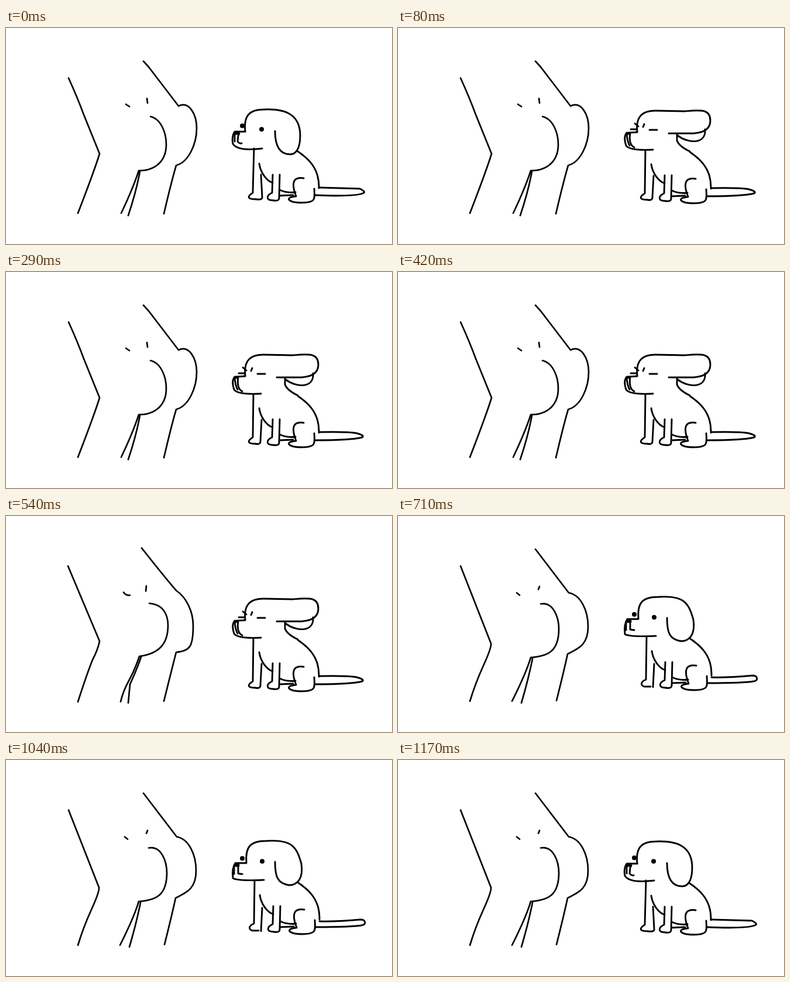
Animation of 660x371 px, one loop 1210 ms. Source, as an HTML page:

```html
<!DOCTYPE html>
<html>
<head>
<meta charset="utf-8">
<style>
  html, body { margin: 0; width: 100%; height: 100%; overflow: hidden; background: #fff; }
  svg { display: block; width: 660px; height: 371px; }
  path { fill: none; stroke: #000; stroke-width: 2.7; stroke-linecap: round; stroke-linejoin: round; }
  .dog path { stroke-width: 2.9; }
  .dog .eyes { stroke-width: 8; }
</style>
</head>
<body>
<svg viewBox="0 0 660 371">
  <g id="round">
    <path d="M107 86Q122 119 133 149L160 216Q150 248 123 318"/>
    <path d="M235 57L244 67L295 134C313 125 326 148 326 172C326 198 313 230 291 236Q283 263 270 319"/>
    <path d="M247 152C265 156 274 180 274 200C274 228 256 245 227 245Q217 276 197 318M229 246Q223 280 209 322"/>
    <path d="M205 131L211 135M241 121L242 129"/>
  </g>
  <g id="tight">
    <path d="M106 86L160 215Q157 230 148 247Q138 272 123 319"/>
    <path d="M232 55Q268 101 291 128C309 140 320 165 320 188C320 222 316 232 291 234Q286 253 270 318"/>
    <path d="M245 150C268 152 277 168 277 188C277 222 259 237 228 241Q220 265 210 283T196 319M231 242Q224 263 212 289L209 321"/>
    <path d="M201 131Q205 137 212 136M240 120L239 129"/>
  </g>
  <g id="loose">
    <path d="M107 86L159 219Q160 226 146 257T123 318"/>
    <path d="M235 57L292 132C312 135 325 162 325 190C325 222 308 228 290 237Q284 265 271 317"/>
    <path d="M244 151C266 147 275 175 275 194C275 232 257 241 227 243Q219 270 195 318M230 245Q223 280 211 321"/>
    <path d="M203 132L208 136M242 121L240 126"/>
  </g>

  <g class="dog">
    <g id="torso">
      <path d="M433 233C435 248 445 262 456 266M456 252L455 283C444 288 445 296 456 296Q467 298 467 292L468 252"/>
      <path d="M468 278Q480 284 495 282M468 288L491 287M499 212C518 225 536 242 535 275"/>
      <path d="M509 258C485 254 491 276 496 289C475 291 482 300 506 300C530 300 528 294 527 276"/>
    </g>
    <g id="calm">
      <path d="M409 178C406 150 417 140 440 140C480 138 503 150 503 185C503 210 494 217 486 217C466 217 460 200 460 177"/>
      <path d="M409 178H391C386 185 387 196 388 199Q396 212 438 207"/>
      <path d="M390 183Q394 177 399 181L397 185L396 195Q399 199 403 198M391 181V195M391 182H398"/>
      <path d="M424 207L422 283C411 290 414 294 426 294Q439 296 438 290L436 252"/>
      <path d="M535 274L605 276Q617 282 610 284Q595 290 528 287"/>
      <path class="eyes" d="M404 168h.01M437 174h.01"/>
    </g>
    <g id="windy">
      <path d="M409 178C406 150 420 142 440 142L490 143C515 141 534 138 534 159C534 177 517 181 500 181H463"/>
      <path d="M525 174C527 199 498 200 477 184M477 182V193Q480 203 499 212"/>
      <path d="M409 179L391 180Q385 187 390 202Q396 211 436 209M397 181Q394 200 404 205M391 181Q392 195 396 202M391 182H397"/>
      <path d="M430 175H443M421 165L419 170M398 174H408M405 164L411 169"/>
      <path d="M423 210L422 284C411 291 414 295 426 295Q435 297 435 291L437 254"/>
      <path d="M536 275Q585 274 600 277Q614 281 609 284Q590 289 528 289"/>
    </g>
    <g id="settled">
      <path d="M411 176C409 150 417 139 445 139C490 136 497 150 505 178C509 205 497 215 484 215C464 212 460 200 460 175"/>
      <path d="M411 177H392Q386 186 388 203Q396 208 441 206M391 180H398L397 184V195L404 196M390 183V196M391 182H398"/>
      <path d="M425 208L424 281C413 285 415 294 424 293L432 293M438 254L436 294"/>
      <path d="M536 277Q560 278 606 274C615 274 617 283 608 284Q590 287 530 287"/>
      <path class="eyes" d="M404 169h.01M438 174h.01"/>
    </g>
  </g>
</svg>
<script>
const LOOP = 1210;

// Each cue is [start in ms, pose], held until the next one.
const bodyCues = [[0, "round"], [500, "tight"], [630, "loose"]];
const dogCues = [[0, "calm"], [40, "windy"], [630, "settled"], [1130, "calm"]];
const torsoShift = { calm: "0 0", windy: "0 1", settled: "1 -1" };

function show(cues, t) {
  const [, pose] = cues.findLast(([start]) => t >= start);
  for (const [, id] of cues) {
    document.getElementById(id).style.display = id === pose ? "" : "none";
  }
  return pose;
}

function render() {
  const t = performance.now() % LOOP;
  show(bodyCues, t);
  const pose = show(dogCues, t);
  document.getElementById("torso").setAttribute("transform", `translate(${torsoShift[pose]})`);
  requestAnimationFrame(render);
}
render();
</script>
</body>
</html>
```
